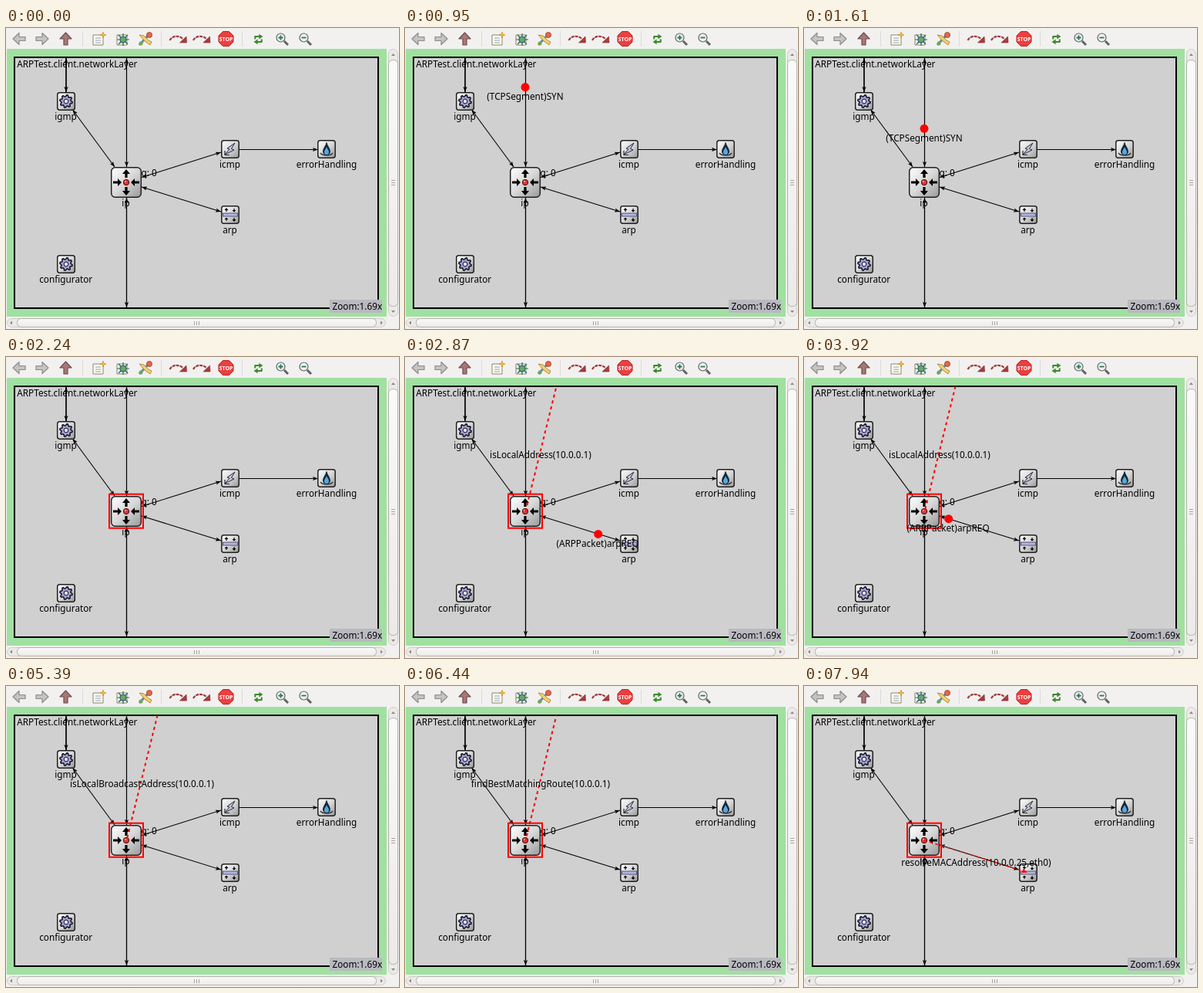
Animation, 510 px wide and 390 px high, one loop 8 s. Source, as an HTML page:

```html
<!DOCTYPE html>
<html lang="en">
<head>
<meta charset="utf-8">
<title>Network layer</title>
<style>
html, body { margin: 0; width: 100%; height: 100%; overflow: hidden; background: #f2f1f0; }
svg { display: block; }
text { font: 11.75px "Noto Sans", "Open Sans", sans-serif; fill: #000; white-space: pre; }
.mid { text-anchor: middle; }
.wire { stroke: #000; fill: none; }
.call { stroke: #f00; stroke-dasharray: 4 4; fill: none; }
</style>
</head>
<body>
<svg id="stage" width="510" height="390" viewBox="0 0 510 390">
  <defs>
    <marker id="tip" viewBox="0 0 7 6" refX="7" refY="3" markerWidth="7" markerHeight="6"
      markerUnits="userSpaceOnUse" orient="auto-start-reverse"><path d="M0 .4 7 3 0 5.6 1.5 3z"/></marker>
    <marker id="redTip" viewBox="0 0 7 6" refX="7" refY="3" markerWidth="7" markerHeight="6"
      markerUnits="userSpaceOnUse" orient="auto"><path d="M0 .4 7 3 0 5.6z" fill="#f00"/></marker>
    <linearGradient id="tile" x2="1" y2="1">
      <stop offset="0" stop-color="#fff"/><stop offset=".5" stop-color="#d8d8d8"/><stop offset="1" stop-color="#989898"/>
    </linearGradient>
    <linearGradient id="bar" x2="0" y2="1">
      <stop offset="0" stop-color="#fafaf9"/><stop offset="1" stop-color="#eceae8"/>
    </linearGradient>
  </defs>
</svg>
<script>
const stage = document.getElementById("stage");
const LOOP = 8000, START = 500, STEP = 30;

function add(tag, attrs, parent = stage) {
  const el = document.createElementNS("http://www.w3.org/2000/svg", tag);
  for (const k in attrs) el.setAttribute(k, attrs[k]);
  return parent.appendChild(el);
}
const rect = (x, y, width, height, fill, more) => add("rect", { x, y, width, height, fill, ...more });
const path = (d, fill = "none", stroke = "none", w = 1, parent = stage) =>
  add("path", { d, fill, stroke, "stroke-width": w, "stroke-linejoin": "round" }, parent);
const group = (x, y) => add("g", { transform: `translate(${x} ${y})` });
function text(x, y, str, cls = "mid") {
  const el = add("text", { x, y, class: cls });
  el.textContent = str;
  return el;
}

// Toolbar
function toolArrow(x, angle, fill, edge) {
  const g = add("g", { transform: `translate(${x} 14) rotate(${angle})` });
  path("M-8 0 0-7.5V-2.5H8V2.5H0V7.5z", fill, edge, 1.2, g);
}
function sheet(x, fill, edge) {
  const g = group(x, 14);
  path("M-7-5H6V8H-7z", fill, edge, 1, g);
  path("M-4-1H3M-4 2H3M-4 5H3", "none", "#8a9aaa", 1, g);
  return g;
}
function runArrow(x) {
  const g = group(x, 14);
  path("M-11 2C-8-4 1-5 6 0", "none", "#a03c3c", 2.2, g).setAttribute("stroke-dasharray", "4 1");
  path("M10.5-3 11 5H2z", "#a83c3c", "#802828", .6, g);
}
function lens(x, plus) {
  const g = group(x, 14);
  path("M3 3 8 8", "none", "#606468", 3, g);
  add("circle", { cx: -1.5, cy: -1.5, r: 5.5, fill: "#eef2f0", stroke: "#606468", "stroke-width": 1.2 }, g);
  path("M-4.5-1.5H1.5" + (plus ? "M-1.5-4.5V1.5" : ""), "none", "#2c7858", 1.8, g);
}
function toolbar() {
  rect(0, 0, 510, 27, "#f2f1f0");
  toolArrow(17, 0, "#c4c4c2", "#8c8c8a");
  toolArrow(47, 180, "#c4c4c2", "#8c8c8a");
  toolArrow(77.5, 90, "#a87878", "#704c4c");
  for (const x of [99.5, 201.5, 306.5]) path(`M${x} 4V24`, "none", "#dcdad8");

  let g = sheet(120, "#fffef4", "#8c8468");
  path("M6-9 7-6 10-5 7-4 6-1 5-4 2-5 5-6z", "#f4b838", "#c88a18", .6, g);
  g = sheet(151, "#f4f8f0", "#8c8468");
  path("M-5-5 7 7M7-5-5 7M1-7V9M-7 1H9", "none", "#28606c", 1.2, g);
  add("circle", { cx: 1, cy: 1, r: 4, fill: "#68a860", stroke: "#28606c" }, g);
  g = group(181, 14);
  path("M-8 8 5-6", "none", "#5c8cb8", 3, g);
  path("M-8-5-2-4 4 2 8 4 6 8-1 3z", "#f0d070", "#a87828", .8, g);
  add("circle", { cx: 5, cy: -5, r: 3.6, fill: "#e06848", stroke: "#983820", "stroke-width": .7 }, g);
  add("circle", { cx: -6, cy: 6, r: 2.5, fill: "#70a850" }, g);

  runArrow(223.5);
  runArrow(254);
  g = group(285.5, 14);
  path("M-4-9.5H4L9.5-4V4L4 9.5H-4L-9.5 4V-4z", "#ea4040", "#c02020", 1, g);
  const stop = add("text", { x: 0, y: 2.6, class: "mid", style: "font-size:7px;font-weight:700;fill:#fff" }, g);
  stop.textContent = "STOP";

  g = add("g", { transform: "translate(327.5 14.5) scale(.85)" });
  path("M-5 0V-4H2M5 0V4H-2", "none", "#3c8a2c", 2.4, g);
  path("M1-8 7-4 1 0zM-1 0-7 4-1 8z", "#3c8a2c", "none", 1, g);
  lens(358, true);
  lens(388, false);
}

// Scroll bars
function scrollBars() {
  const trough = { stroke: "#d0ccc8", rx: 6 }, thumb = { stroke: "#b4afaa", rx: 5 };
  rect(494, 27, 16, 348, "#f2f1f0");
  rect(496.5, 27.5, 12, 346, "#eceae8", trough);
  rect(496.5, 41.5, 12, 319, "url(#bar)", thumb);
  rect(0, 374, 510, 16, "#f2f1f0");
  rect(1.5, 376.5, 491, 11, "#eceae8", trough);
  rect(14.5, 376.5, 466, 11, "url(#bar)", thumb);
  path("M500 36 502.5 33 505 36zM500 366 502.5 369 505 366zM8 379.5 5 382 8 384.5zM486 379.5 489 382 486 384.5z", "#8c8782");
  path("M500 197.5H505M500 200.5H505M500 203.5H505M244.5 380V385M247.5 380V385M250.5 380V385", "none", "#a8a4a0");
}

// Modules
function tile(x, y, r) {
  const g = group(x, y);
  add("rect", { x: -r, y: -r, width: 2 * r, height: 2 * r, rx: r > 15 ? 5 : 3,
    fill: "url(#tile)", stroke: "#202020", "stroke-width": 1.5 }, g);
  return g;
}
function gear(x, y) {
  const g = tile(x, y, 11.3);
  let d = "";
  for (let i = 0; i < 32; i++) {
    const a = (i + .5) * Math.PI / 16, r = i % 4 < 2 ? 8.2 : 6.2;
    d += (i ? "L" : "M") + (r * Math.cos(a)).toFixed(2) + " " + (r * Math.sin(a)).toFixed(2);
  }
  path(d + "z", "#a8a8d4", "#18182c", 1.6, g);
  add("circle", { r: 2.8, fill: "#e4e4ec", stroke: "#303058", "stroke-width": 1.2 }, g);
}
function modules() {
  gear(78, 95);
  gear(78, 306);

  let g = tile(156, 200, 19.3);
  const up = "M0-17 5-11H1.6V-6H-1.6V-11H-5z", into = "M-6 0-11-5V-1.6H-17V1.6H-11V5z";
  path(up + into, "#000", "none", 1, g);
  const flip = add("g", { transform: "rotate(180)" }, g);
  path(up + into, "#000", "none", 1, flip);
  add("circle", { r: 3.7, fill: "#d83838", stroke: "#401010" }, g);
  add("circle", { cx: -1, cy: -1.2, r: 1.1, fill: "#f4a0a0" }, g);

  g = tile(291, 157, 11.2);
  path("M6-8-4-1-1 0-7 7 5 1 1.5-.5z", "#c0c4d4", "#282c38", 1, g);
  path("M-7 2V7.5H-1", "none", "#282c38", 1.2, g);
  g = tile(416, 157, 11.2);
  path("M0-8.5C1-4 4.5-1 4.5 3A4.5 4.5 0 0 1-4.5 3C-4.5-1-1-4 0-8.5z", "#102838", "#101820", .8, g);
  path("M0-3C1 0 3 1 3 4A3 3 0 0 1-3 4C-3 1-1 0 0-3z", "#58a8e0", "none", 1, g);
  path("M-8 5C-5 9 5 9 8 5", "none", "#303840", 1.3, g);

  g = tile(291, 242, 11.2);
  add("rect", { x: -9.5, y: -2, width: 19, height: 4, fill: "#b4b4e0", stroke: "#585880" }, g);
  path("M-5-4V-8M5-4V-8M-5 4V8M5 4V8", "none", "#000", 1.2, g);
  path("M-7.5-6-5-9-2.5-6zM2.5-6 5-3.5 7.5-6zM-7.5 6-5 3.5-2.5 6zM2.5 6 5 9 7.5 6z", "#000", "none", 1, g);

  for (const [x, y, name] of [[77.5, 119, "igmp"], [155.5, 231, "ip"], [290.5, 181, "icmp"],
    [416, 181, "errorHandling"], [290.5, 266, "arp"], [77.7, 330, "configurator"]]) text(x, y, name);
}

function wires() {
  for (const [d, w, both] of [
    ["M78 39V83", 1.7, 1], ["M156.5 39V180", 1.2, 1], ["M156.5 220V362", 1.3, 1],
    ["M86.5 106 141 180", 1.1, 1], ["M176 193.5 279 161", 1.1, 1],
    ["M302 157.5H405", 1.1, 0], ["M176 206 279 238", 1.1, 1]]) {
    const el = add("path", { d, class: "wire", "stroke-width": w, "marker-end": "url(#tip)" });
    if (both) el.setAttribute("marker-start", "url(#tip)");
  }
}

rect(0, 0, 510, 390, "#f2f1f0");
toolbar();
rect(1, 27, 493, 347, "#a0e0a0");
rect(11, 38, 472, 325, "#d0d0d0", { stroke: "#000", "stroke-width": 2 });
scrollBars();
wires();
text(14.3, 51, "ARPTest.client.networkLayer", "");
text(175.5, 192, "q: 0", "");
modules();
rect(420, 352, 68, 17, "#b9b9c0");
text(423.5, 365, "Zoom:1.69x", "");

const frame = rect(134, 177.7, 44, 44, "none", { stroke: "#f00", "stroke-width": 2 });
const line = add("path", { class: "call" });
const callText = text(0, 0, "");
const msgText = text(0, 0, "");
const ball = add("circle", { r: 5.5, fill: "#f00" });

// Travelling messages: begin, end, from, to, label
const messages = [
  [500, 2240, [156, 40], [156, 181.5], "(TCPSegment)SYN"],
  [2390, 4090, [279.5, 238.5], [177.5, 206.5], "(ARPPacket)arpREQ"]
];
// Method calls: begin, path, label x, label baseline, label
const upward = "M156.5 200 196.5 38", toArp = "M156 200 290 241.5";
const calls = [
  [2390, upward, 176, 131, "isLocalAddress(10.0.0.1)"],
  [4090, upward, 176.5, 131, "isLocalBroadcastAddress(10.0.0.1)"],
  [5790, upward, 176, 131, "findBestMatchingRoute(10.0.0.1)"],
  [7490, toArp, 223.5, 233, "resolveMACAddress(10.0.0.25,eth0)"]
];

const show = (el, on) => el.setAttribute("visibility", on ? "visible" : "hidden");
function place(el, x, y, str) {
  el.setAttribute("x", x);
  el.setAttribute("y", y);
  if (el.textContent !== str) el.textContent = str;
}

function draw(now) {
  const time = now % LOOP;
  const t = START + Math.floor((time - START) / STEP) * STEP;
  const msg = messages.find(m => t >= m[0] && t < m[1]);
  const call = calls.filter(c => t >= c[0]).pop();

  show(frame, t >= 2240);
  show(ball, msg);
  show(msgText, msg);
  if (msg) {
    const [begin, end, a, b, label] = msg, p = (t - begin) / (end - begin);
    const x = a[0] + (b[0] - a[0]) * p, y = a[1] + (b[1] - a[1]) * p;
    ball.setAttribute("cx", x);
    ball.setAttribute("cy", y);
    place(msgText, Math.round(x - .4), Math.round(y + 16.5), label);
  }

  show(line, call);
  show(callText, call);
  if (call) {
    const [begin, d, x, y, label] = call;
    line.setAttribute("d", d);
    line.setAttribute("stroke-dashoffset", -((t - begin) / STEP) % 8);
    line.setAttribute("stroke-width", d === toArp ? 1.5 : 2);
    line.setAttribute("marker-end", d === toArp ? "url(#redTip)" : "none");
    place(callText, x, y, label);
  }
}

let origin;
function tick(now) {
  origin ??= now;
  draw(now - origin);
  requestAnimationFrame(tick);
}
draw(0);
requestAnimationFrame(tick);
</script>
</body>
</html>
```
